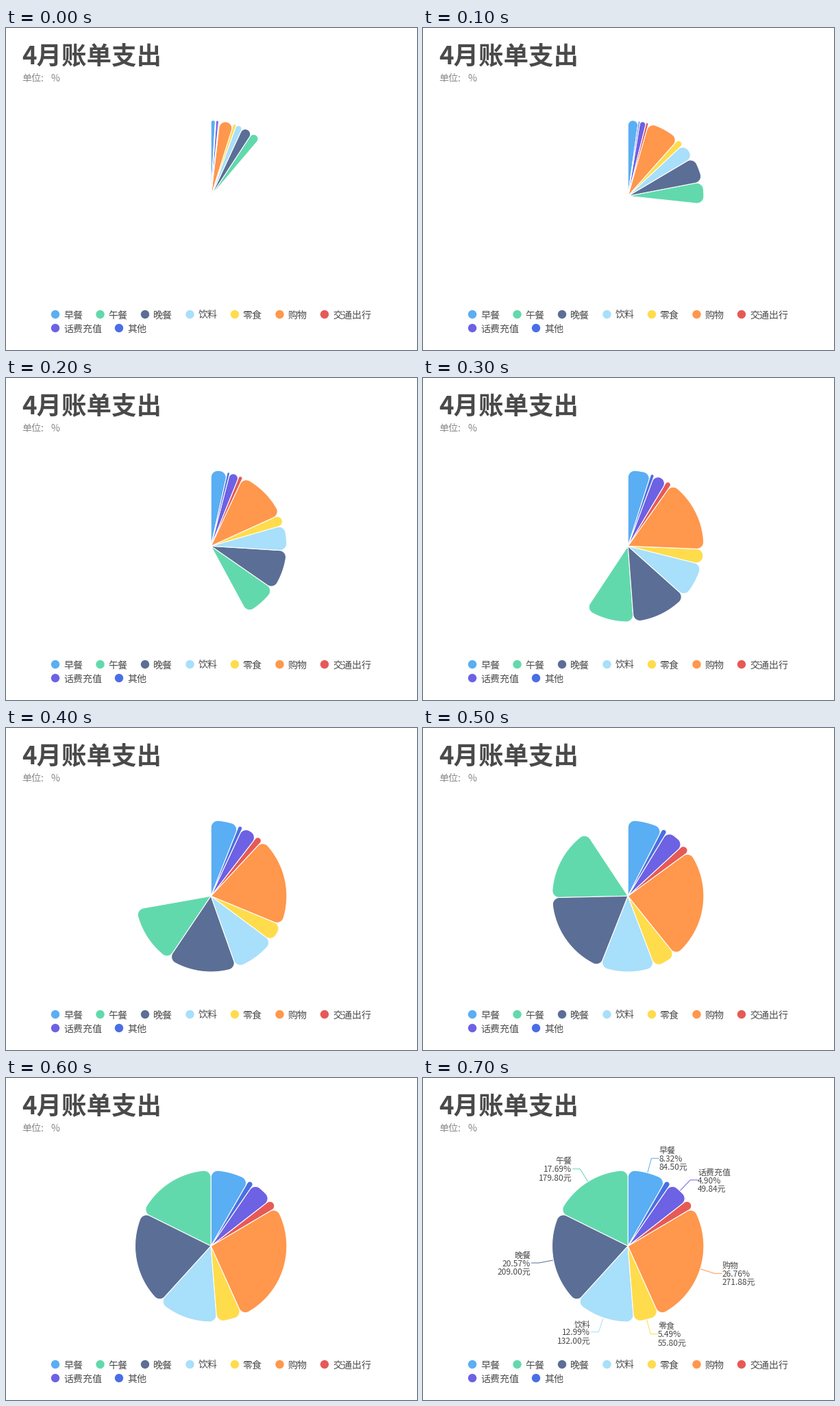
Recreate the animation shown at these times as a matplotlib script. Size 600 by 470 pixels, loop 2.5 s.

```python
import numpy as np
import matplotlib.pyplot as plt
from matplotlib.animation import FuncAnimation
from matplotlib.patches import Circle, Polygon

W, H, DPI = 600, 470, 100
CX, CY, R, CORNER = 299.2, 245.3, 110.7, 10
ELBOW = 132.5
TEXT = "#4a4a4a"

# name, colour, share in percent, amount (None: no label), in legend order
ITEMS = [
    ("早餐", "#5AAEF3", 8.32, 84.50),
    ("午餐", "#62D9AD", 17.69, 179.80),
    ("晚餐", "#5B6E96", 20.57, 209.00),
    ("饮料", "#A8DFFA", 12.99, 132.00),
    ("零食", "#FFDC4C", 5.49, 55.80),
    ("购物", "#FF974C", 26.76, 271.88),
    ("交通出行", "#E65A56", 2.02, None),
    ("话费充值", "#6D61E4", 4.90, 49.84),
    ("其他", "#4A6FE2", 1.26, None),
]
# Opened part of the pie at each 100 ms step
SWEEP = [0.112, 0.267, 0.421, 0.593, 0.722, 0.907, 1.0]
LABEL_STEP = 7
STEPS, STEP_MS = 25, 100

plt.rcParams["font.family"] = "Noto Sans CJK JP"
fig = plt.figure(figsize=(W / DPI, H / DPI), dpi=DPI, facecolor="white")
ax = fig.add_axes([0, 0, 1, 1])
ax.set_xlim(0, W)
ax.set_ylim(H, 0)
ax.axis("off")


def px(size):
    return size * 72 / DPI


def write(x, y, text, size, color=TEXT, **kw):
    """Place one line of text with its middle at height y."""
    return ax.text(x, y + 0.37 * size, text, fontsize=px(size), color=color,
                   va="baseline", **kw)


def polar(r, angle, x=CX, y=CY):
    """Point at a clockwise angle from the top."""
    return np.column_stack([x + r * np.sin(angle), y - r * np.cos(angle)])


def sector(a0, a1):
    """Outline of a slice whose two outer corners are rounded."""
    s = np.sin(min((a1 - a0) / 2, np.pi / 2))
    c = min(CORNER, R * s / (1 + s))
    off = np.arcsin(c / (R - c))
    b0, b1 = a0 + off, a1 - off
    p0, p1 = polar(R - c, np.array([b0, b1]))
    return np.vstack([
        [(CX, CY)],
        polar(c, np.linspace(a0 - np.pi / 2, b0, 16), *p0),
        polar(R, np.linspace(b0, b1, 60)),
        polar(c, np.linspace(b1, a1 + np.pi / 2, 16), *p1),
    ])


def slice_angles():
    """Start and end of each slice; the first leads, the rest follow reversed."""
    total = sum(item[2] for item in ITEMS)
    angles, start = {}, 0.0
    for i in [0] + list(range(len(ITEMS) - 1, 0, -1)):
        end = start + ITEMS[i][2] / total * 2 * np.pi
        angles[i] = (start, end)
        start = end
    return angles


def add_label(name, color, share, amount, mid):
    x0, y0 = polar(R, np.array([mid]))[0]
    x1, y1 = polar(ELBOW, np.array([mid]))[0]
    side = 1 if x1 > CX else -1
    line, = ax.plot([x0, x1, x1 + side * 10.5], [y0, y1, y1], color=color,
                    lw=px(1), zorder=1)
    lines = [name, f"{share:.2f}%", f"{amount:.2f}元"]
    align = "left" if side > 0 else "right"
    return [line] + [
        write(x1 + side * 11.5 - 0.5, y1 + 0.3 + (k - 1) * 12.2, t, 12,
              ha=align)
        for k, t in enumerate(lines)
    ]


write(22.8, 38.9, "4月账单支出", 36.5, weight="bold")
# The colon hugs the left of its full-width cell
for x, part in [(23.5, "单位:"), (65.5, "%")]:
    write(x, 73, part, 14, color="#8a8a8a")

for i, (name, color, _, _) in enumerate(ITEMS):
    if i < 7:
        x, y = 72 + 65.5 * i, 418
    else:
        x, y = 72 + 93 * (i - 7), 438
    ax.add_patch(Circle((x, y), 6.2, fc=color, lw=0))
    write(x + 12, y + 0.3, name, 14)

ANGLES = slice_angles()
slices, labels = [], []
for i, (name, color, share, amount) in enumerate(ITEMS):
    patch = Polygon([(CX, CY)], closed=True, fc=color, ec="white", lw=px(1.1),
                    joinstyle="bevel", zorder=2)
    slices.append(ax.add_patch(patch))
    if amount is not None:
        labels += add_label(name, color, share, amount, sum(ANGLES[i]) / 2)


def draw(step):
    sweep = SWEEP[min(step, len(SWEEP) - 1)]
    for i, patch in enumerate(slices):
        a0, a1 = ANGLES[i]
        patch.set_xy(sector(a0 * sweep, a1 * sweep))
    for part in labels:
        part.set_visible(step >= LABEL_STEP)
    return slices + labels


anim = FuncAnimation(fig, draw, frames=STEPS, interval=STEP_MS,
                     init_func=lambda: draw(0), repeat=True, repeat_delay=0)
plt.show()
```
